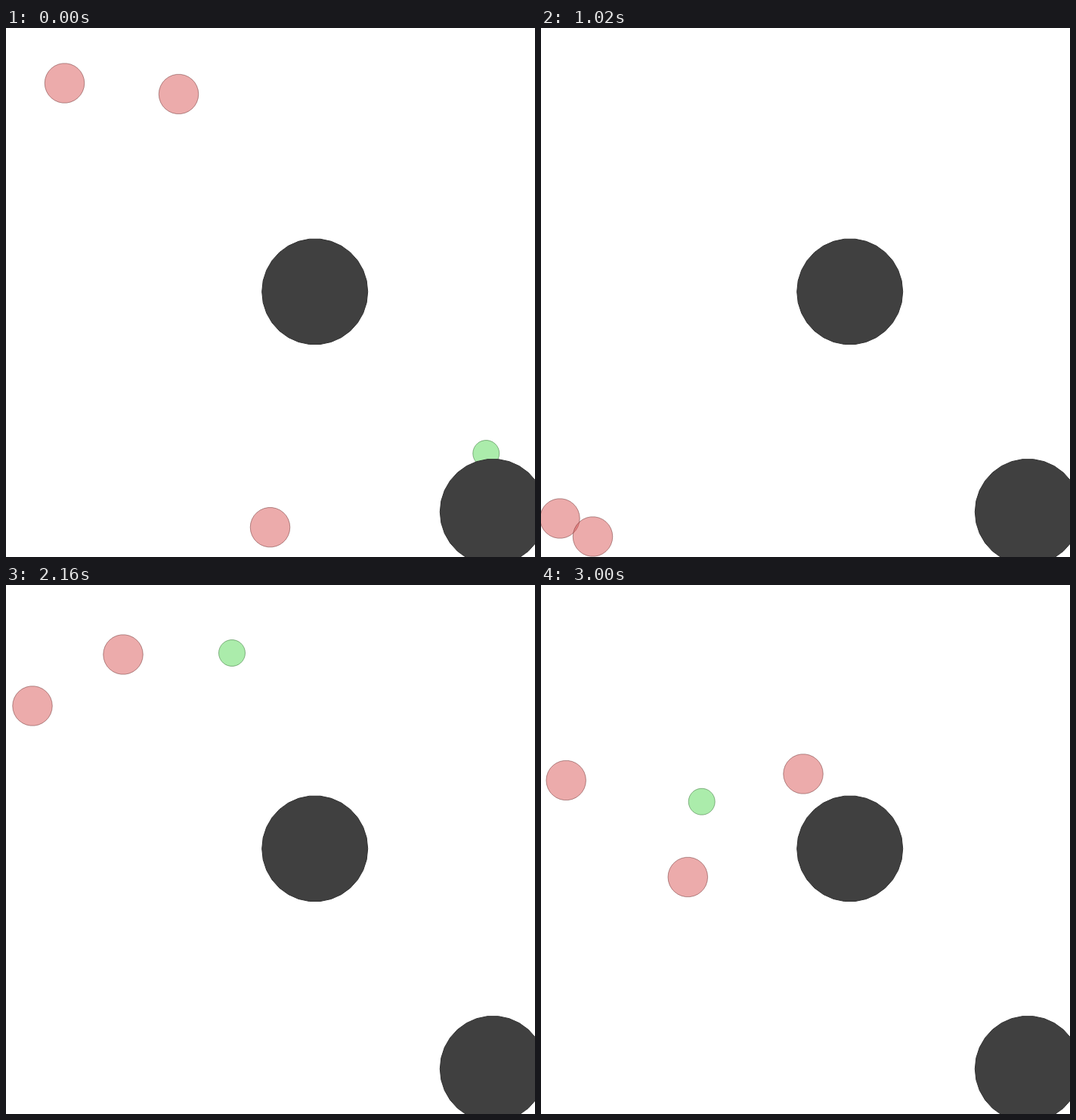
Animation, 700 px wide and 700 px high, one loop 3.03 s. Source, as an HTML page:

```html
<!DOCTYPE html>
<html lang="en">
<head>
<meta charset="utf-8">
<title>Chase</title>
<style>
  html, body { margin: 0; width: 100%; height: 100%; overflow: hidden; background: #fff; }
  svg { display: block; width: 100%; height: 100%; }
  .agent { fill-opacity: .5; stroke-opacity: .5; }
  .chaser { fill: rgb(217, 89, 89); stroke: rgb(108, 45, 45); }
  .runner { fill: rgb(89, 217, 89); stroke: rgb(45, 108, 45); }
  .rock { fill: #404040; stroke: #303030; }
</style>
</head>
<body>
<svg id="stage" viewBox="0 0 700 700"></svg>
<script>
const STEP = 30, STEPS = 101, SIDES = 30;
const LEAP = [-8, -20]; // starting speed of every agent, px per step
const TURNS = [0, 16, 34, 46, 60, 72, 83, 91, 100]; // steps at which paths bend
const stage = document.getElementById('stage');

function addDisc(kind, r, x, y) {
  const disc = document.createElementNS('http://www.w3.org/2000/svg', 'polygon');
  const corners = Array.from({ length: SIDES }, (_, i) => {
    const a = 2 * Math.PI * i / SIDES;
    return `${(r * Math.cos(a)).toFixed(2)},${(r * Math.sin(a)).toFixed(2)}`;
  });
  disc.setAttribute('points', corners.join(' '));
  disc.setAttribute('class', kind);
  place(disc, x, y);
  stage.append(disc);
  return disc;
}

function place(disc, x, y) {
  disc.setAttribute('transform', `translate(${x} ${y})`);
}

// Speed along one axis while passing turn i
function speed(path, i, axis) {
  if (i === 0) return LEAP[axis];
  const next = Math.min(i + 1, path.length - 1);
  return (path[next][axis] - path[i - 1][axis]) / (TURNS[next] - TURNS[i - 1]);
}

// Momentum-like cubic curve from turn to turn
function pointAt(path, step) {
  let i = 0;
  while (i < TURNS.length - 2 && TURNS[i + 1] <= step) i++;
  const span = TURNS[i + 1] - TURNS[i];
  const u = (step - TURNS[i]) / span, v = 1 - u;
  return [0, 1].map(axis =>
    v * v * (1 + 2 * u) * path[i][axis] + u * u * (1 + 2 * v) * path[i + 1][axis]
    + span * u * v * (v * speed(path, i, axis) - u * speed(path, i + 1, axis)));
}

function addAgent(kind, r, ...path) {
  return { path, disc: addDisc('agent ' + kind, r, ...path[0]) };
}

const agents = [
  addAgent('chaser', 26.25, [77.5, 73], [-25.5, 125], [25, 649], [130, 414.5],
    [-50, 60], [-40, 210], [-3.3, 318.5], [50, 290], [33.2, 258.5]),
  addAgent('chaser', 26.25, [228.5, 87.5], [105.5, 116.5], [68.5, 673], [180.3, 502.5],
    [-3.5, 149.7], [35, 160], [193.5, 341], [212, 395], [194.3, 386.5]),
  addAgent('chaser', 26.25, [349.5, 660.7], [432, 441.2], [100, 732], [235.5, 456],
    [101.3, 100], [155, 92], [292.8, 229.2], [325, 215], [347, 250]),
  addAgent('runner', 17.5, [635.3, 563], [180.4, 421], [-40, 600], [184.6, 271.7],
    [0, 69.3], [299, 90], [365.4, 140.4], [462, 80], [212.7, 286.7])
];
for (const [x, y] of [[408.7, 348.9], [644.3, 640.3]]) addDisc('rock', 70, x, y);

function draw(now) {
  const step = Math.floor((now + 1) / STEP) % STEPS;
  for (const { path, disc } of agents) place(disc, ...pointAt(path, step));
}

function tick(now) {
  draw(now);
  requestAnimationFrame(tick);
}
draw(0);
requestAnimationFrame(tick);
</script>
</body>
</html>
```
